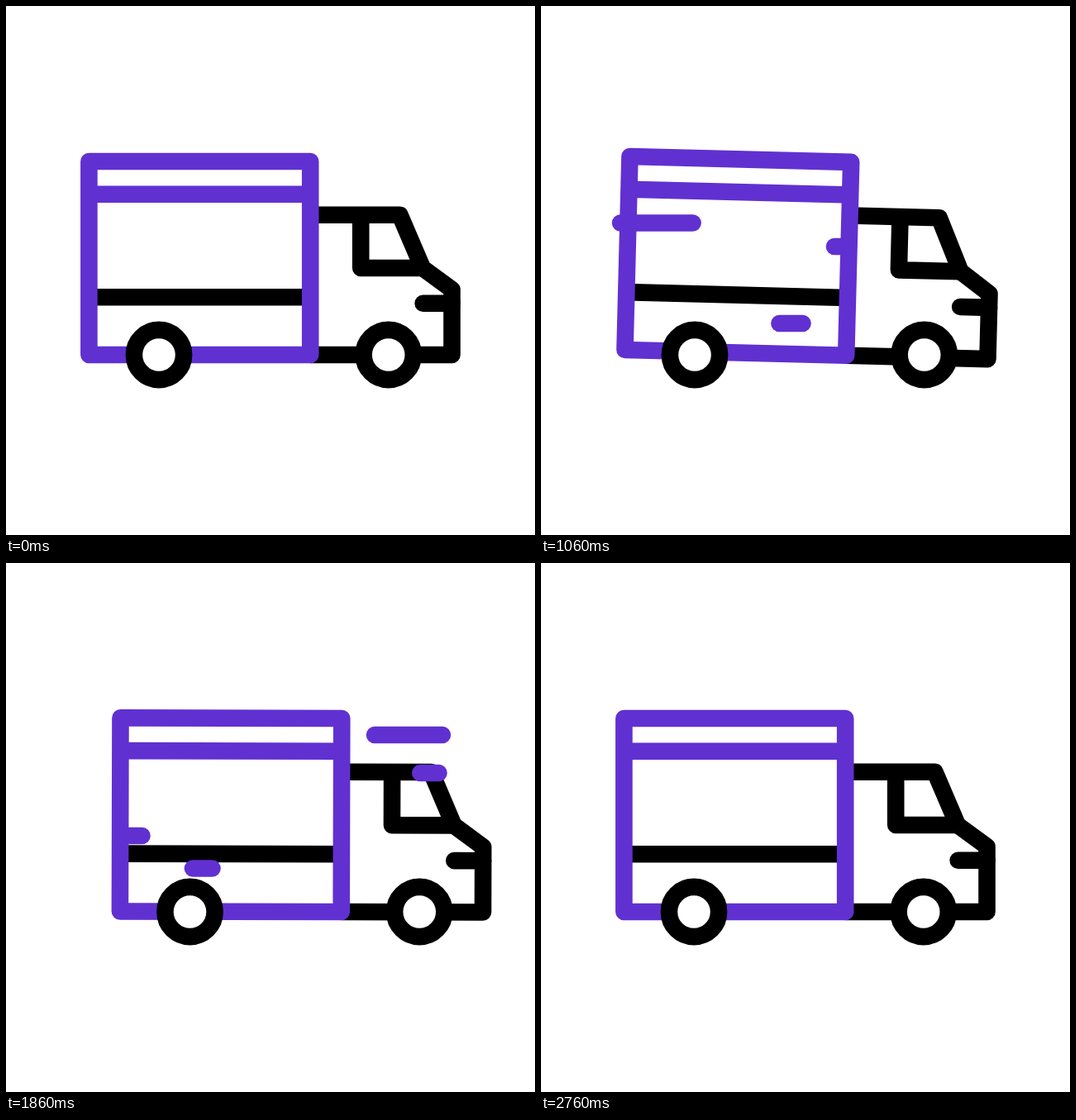
Write an HTML page with a canvas that moves like this. It is 640x640 px and loops after 2.8 s.

```html
<!DOCTYPE html>
<html lang="en">
<head>
<meta charset="utf-8">
<title>Delivery truck</title>
<style>
  html, body { margin: 0; width: 100%; height: 100%; overflow: hidden; background: #fff; }
  canvas { display: block; width: 640px; height: 640px; }
</style>
</head>
<body>
<canvas id="stage"></canvas>
<script>
const LOOP = 2800, STEP = 20;
const PURPLE = '#6130d1', BLACK = '#000', WHITE = '#fff';
const WEIGHT = 20.6;
const BOX = { left: 100.4, top: 188, right: 368.2, bottom: 422 };
const PIVOT_X = 338;
const SWEEP = 385, LAG = 207;

const canvas = document.getElementById('stage');
const ratio = window.devicePixelRatio || 1;
canvas.width = canvas.height = 640 * ratio;
const ctx = canvas.getContext('2d');

const clamp01 = v => Math.max(0, Math.min(1, v));
const easeInOut = u => (1 - Math.cos(Math.PI * u)) / 2;
const easeOut = u => u + 0.3 * u * (1 - u);

// Eases from rest to rest between [time, value] poses.
function sway(...poses) {
  return t => poses.reduce((value, [end, target], i) => {
    if (i === 0) return target;
    const [start, origin] = poses[i - 1];
    return value + (target - origin) * easeInOut(clamp01((t - start) / (end - start)));
  }, 0);
}

const shift = sway([350, 0], [775, -25.5], [1430, 41], [1755, 42], [2380, -24], [2760, 0]);
const tilt = sway([220, 0], [480, -2.83], [1220, 2], [1495, 2], [1935, 0], [2380, 2], [2760, 0]);

function line(color, points, cap = 'butt', closed = false) {
  ctx.strokeStyle = color;
  ctx.lineCap = cap;
  ctx.beginPath();
  points.forEach(([x, y]) => ctx.lineTo(x, y));
  if (closed) ctx.closePath();
  ctx.stroke();
}

function wheel(x) {
  ctx.strokeStyle = BLACK;
  ctx.fillStyle = WHITE;
  ctx.beginPath();
  ctx.arc(x, 422, 30.1, 0, Math.PI * 2);
  ctx.fill();
  ctx.stroke();
}

function cab() {
  const { right, bottom } = BOX, roof = 252.7, sill = 317, nose = 539.5;
  line(BLACK, [[right, roof], [476.5, roof], [504, sill], [nose, 343], [nose, bottom], [right, bottom]]);
  line(BLACK, [[429.2, roof], [429.2, sill], [504, sill]]);
  line(BLACK, [[504.6, 359.7], [nose, 359.7]], 'round');
}

function cargo() {
  const { left, top, right, bottom } = BOX;
  line(BLACK, [[left, 352.2], [right, 352.2]]);
  line(PURPLE, [[left, 227.7], [right, 227.7]]);
  line(PURPLE, [[left, top], [right, top], [right, bottom], [left, bottom]], 'butt', true);
}

// A wind streak: its head runs from one end to the other and its tail follows.
function streak(t, start, y, from, to) {
  const age = t - start;
  if (age < 0 || age > SWEEP + LAG) return;
  const at = delay => from + (to - from) * easeOut(clamp01((age - delay) / SWEEP));
  line(PURPLE, [[at(0), y], [at(LAG) + 0.5, y]], 'round');
}

function wind(t) {
  streak(t, 273, 299, 258, 163);
  streak(t, 466, 330, 571, 475);
  streak(t, 506, 291, 509, 355);
  streak(t, 788, 262.5, 216, 60);
  streak(t, 993, 384, 316, 189);
  streak(t, 1561, 208, 572, 420);
  streak(t, 1766, 330, 164, 79);
  streak(t, 1800, 254, 523, 412);
  streak(t, 1800, 369.5, 249, 131);
}

function truck(t) {
  ctx.save();
  ctx.translate(shift(t), 0);
  ctx.save();
  ctx.translate(PIVOT_X, BOX.bottom);
  ctx.rotate(tilt(t) * Math.PI / 180);
  ctx.translate(-PIVOT_X, -BOX.bottom);
  cab();
  cargo();
  ctx.restore();
  wheel(185);
  wheel(462.7);
  ctx.restore();
}

function draw(t) {
  ctx.setTransform(ratio, 0, 0, ratio, 0, 0);
  ctx.fillStyle = WHITE;
  ctx.fillRect(0, 0, 640, 640);
  ctx.lineWidth = WEIGHT;
  ctx.lineJoin = 'round';
  truck(t);
  wind(t);
}

const begin = performance.now();
function tick() {
  const t = (performance.now() - begin) % LOOP;
  draw(Math.floor(t / STEP) * STEP);
  requestAnimationFrame(tick);
}
tick();
</script>
</body>
</html>
```
